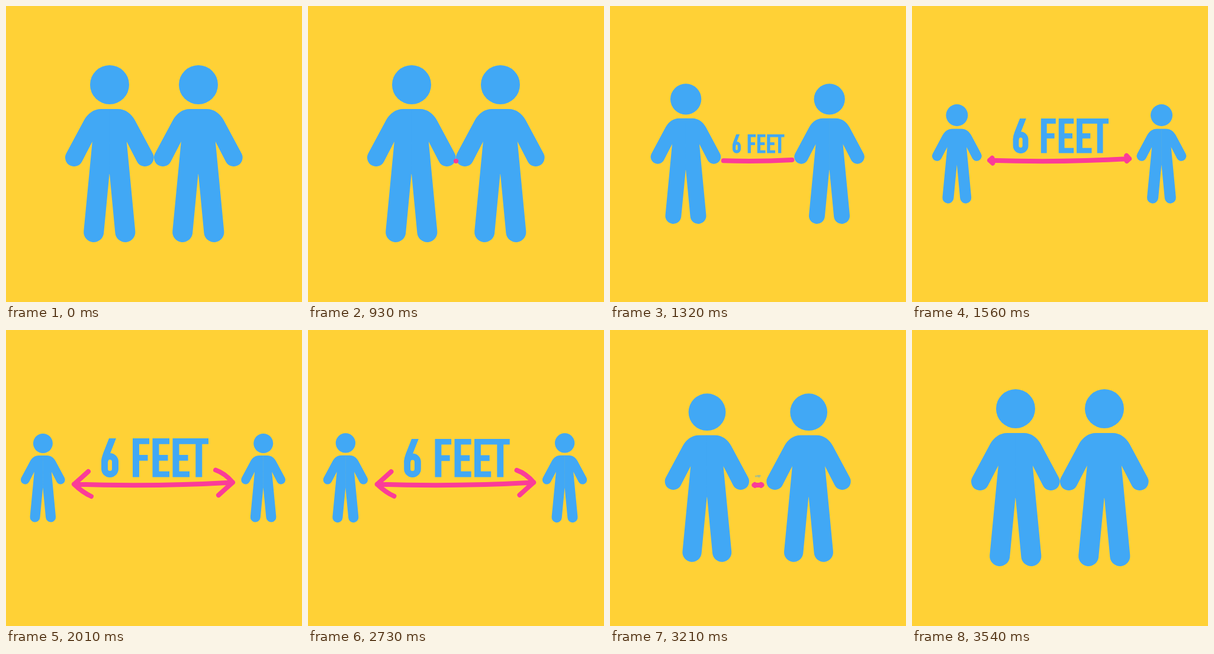
An HTML page with a canvas that plays this animation: 500x500 px, repeating every 3660 ms.

```html
<!DOCTYPE html>
<html lang="en">
<head>
<meta charset="utf-8">
<title>6 FEET</title>
<style>
  html, body { margin: 0; width: 100%; height: 100%; overflow: hidden; background: #ffd136; }
  canvas { display: block; width: 100vmin; height: 100vmin; }
</style>
</head>
<body>
<canvas id="stage" width="500" height="500" role="img" aria-label="6 FEET"></canvas>
<script>
(() => {
const ctx = document.getElementById('stage').getContext('2d');
const LOOP = 3660;
const YELLOW = '#ffd136', BLUE = '#41a8f5', PINK = '#fb3c98';
const rad = deg => deg * Math.PI / 180;
const mix = (a, b, k) => a + (b - a) * k;
const mixPoint = (p, q, k) => [mix(p[0], q[0], k), mix(p[1], q[1], k)];

// Ease along a bezier with handles (a, 0) and (b, 1).
function ease(t, start, length, a = 0.57, b = 0.14) {
  const u = (t - start) / length;
  if (u <= 0) return 0;
  if (u >= 1) return 1;
  let lo = 0, hi = 1;
  for (let i = 0; i < 30; i++) {
    const s = (lo + hi) / 2, r = 1 - s;
    const x = 3 * r * r * s * a + 3 * r * s * s * b + s * s * s;
    if (x < u) lo = s; else hi = s;
  }
  return lo * lo * (3 - 2 * lo);
}

// Left half of the body, relative to the figure's centre.
const half = new Path2D();
half.moveTo(0.4, -76);
half.lineTo(-14, -76);
half.bezierCurveTo(-27, -76, -37, -68, -43, -57);
half.arc(-59.8, 6, 15, rad(208), rad(28), true);
half.lineTo(-29, -21);
half.arc(-26.6, 132, 17, rad(185.5), rad(5.5), true);
half.lineTo(-0.2, 34);
half.lineTo(0.4, 34);
half.closePath();

function person(x, size) {
  ctx.save();
  ctx.translate(x, 250);
  ctx.scale(size, size);
  ctx.fillStyle = BLUE;
  ctx.beginPath();
  ctx.arc(0.2, -117, 33, 0, Math.PI * 2);
  ctx.fill();
  ctx.fill(half);
  ctx.scale(-1, 1);
  ctx.fill(half);
  ctx.restore();
}

// Arrow points are offsets from the middle of the line.
const LEFT = [-135, -1.5], RIGHT = [133, -4.5];
const barbs = [
  [LEFT, [-123, -12], [-111, -23]],
  [LEFT, [-121, 12], [-106, 19]],
  [RIGHT, [120, -20], [104, -25.5]],
  [RIGHT, [121, 6], [109, 17]]
];

function curve(from, bend, to, k) {
  ctx.moveTo(250 + from[0] * k, 262 + from[1] * k);
  ctx.quadraticCurveTo(250 + bend[0] * k, 262 + bend[1] * k, 250 + to[0] * k, 262 + to[1] * k);
}

function arrow(k, grown) {
  ctx.strokeStyle = PINK;
  ctx.lineWidth = 8;
  ctx.lineCap = ctx.lineJoin = 'round';
  ctx.beginPath();
  curve(LEFT, [0, 3], RIGHT, Math.max(k, 0.001));
  if (grown > 0 && k > 0.001) {
    for (const [tip, bend, end] of barbs) {
      const a = mixPoint(tip, bend, grown);
      const b = mixPoint(a, mixPoint(bend, end, grown), grown);
      curve(tip, a, b, k);
    }
  }
  ctx.stroke();
}

// Narrow lettering, with its baseline at y = 0.
const HIGH = -65.5, MIDDLE = -37.5, LOW = -9.8;
const words = new Path2D();
function letter(x, stem, rows) {
  words.rect(x + stem, HIGH, 11, -HIGH);
  for (const [y, width] of rows) words.rect(x, y, width, 9.8);
}
const rowsE = [[HIGH, 28.5], [MIDDLE, 26], [LOW, 28.5]];
letter(-36, 0, [[HIGH, 28], [MIDDLE, 25.5]]);
letter(-2.5, 0, rowsE);
letter(31.5, 0, rowsE);
letter(60, 10.3, [[HIGH, 32]]);

const six = new Path2D();
six.moveTo(-76, HIGH);
six.lineTo(-64, HIGH);
six.lineTo(-74, -40);
six.lineTo(-78, -25);
six.lineTo(-89, -25);
six.quadraticCurveTo(-89, -33, -86, -40);
six.closePath();
const bowl = new Path2D();
bowl.roundRect(-83.5, -35, 18, 30, 9);

function label(size) {
  if (size <= 0) return;
  ctx.save();
  ctx.translate(250, 248.5);
  ctx.scale(size, size);
  ctx.fillStyle = ctx.strokeStyle = BLUE;
  ctx.lineWidth = 11;
  ctx.fill(words);
  ctx.fill(six);
  ctx.stroke(bowl);
  ctx.restore();
}

function draw(t) {
  ctx.fillStyle = YELLOW;
  ctx.fillRect(0, 0, 500, 500);

  const apart = ease(t, 930, 1050, 0.58) - ease(t, 2655, 885, 0.554);
  const size = 1 - apart / 2;
  person(mix(174.8, 62.3, apart), size);
  person(mix(324.8, 434.6, apart), size);

  if (t >= 930 && t < 3540) {
    const back = ease(t, 2650, 780);
    label(ease(t, 915, 1050) - back);
    arrow(ease(t, 930, 1050) - back, ease(t, 1440, 570, 0.3, 0.3));
  }
}

const begin = performance.now();
function tick() {
  draw((performance.now() - begin) % LOOP);
  requestAnimationFrame(tick);
}
tick();
})();
</script>
</body>
</html>
```
